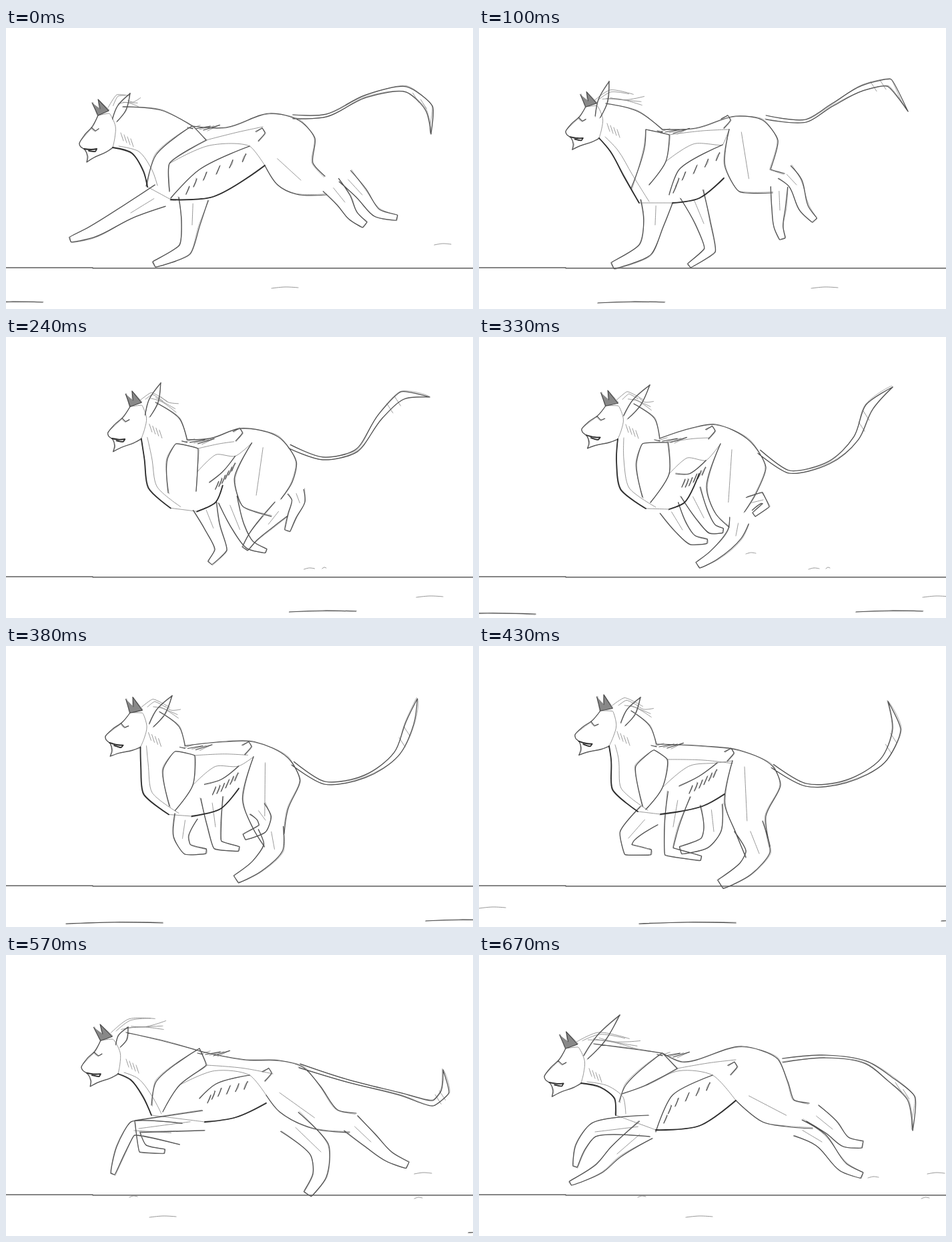
Animation, 700 px wide and 421 px high, one loop 750 ms. Source, as an HTML page:

```html
<!DOCTYPE html>
<html lang="en">
<head>
<meta charset="utf-8">
<title>Run cycle</title>
<style>
html, body { margin: 0; width: 100%; height: 100%; overflow: hidden; background: #fff; }
svg { display: block; width: 100%; height: 100%; }
path { fill: none; stroke-linecap: round; stroke-linejoin: round; }
</style>
</head>
<body>
<svg id="stage" viewBox="0 0 700 421">
  <path d="M0 359.2H130M130 359.8H700" stroke="#3c3c3c" stroke-width="1.2"/>
</svg>
<script>
// Joints of the skeleton in each key pose; outlines and details are built from them.
// head: nose, brow, jaw, ear tip, mane tip, crown, neck. size: thickness of the four legs.
const poses = [
  { head: '110,173 138,131 160,179 186,98 220,106 175,118 232,123',
    spine: '280,147 330,149 395,128 440,139 463,165 460,202 478,222',
    chest: '188,187 206,215 212,238', belly: '247,257 310,253 388,206',
    thigh: '388,206 407,235 435,249 480,250', rib: '247,255 290,212 365,177',
    blade: '210,237 225,190 280,147 300,168 245,203 245,245',
    tail: '430,133 480,131 540,102 600,92 634,120 637,159',
    foreL: '231,251 185,274 128,306 96,317', foreR: '281,256 277,292 268,332 222,354',
    hindL: '487,235 506,258 520,281 538,295', hindR: '508,222 532,247 556,277 586,284',
    size: '.9,1.1 1,.8' },
  { head: '130,155 160,118 180,165 195,80 266,104 190,113 238,125',
    spine: '275,152 325,150 385,132 425,138 448,168 437,212 458,218',
    chest: '197,185 217,222 240,262', belly: '290,262 330,255 367,225',
    thigh: '375,152 368,205 390,245 440,247', rib: '285,250 300,212 365,175',
    blade: '228,240 248,180 250,152 285,160 280,200 255,235',
    tail: '430,134 490,139 530,115 575,90 615,82 643,125',
    foreL: '266,260 262,292 249,332 200,356', foreR: '319,249 335,290 346,333 315,356',
    hindL: '450,238 449,270 449,298 455,316', hindR: '458,216 474,232 487,270 503,288',
    size: '1.2,.9 .85,.9' },
  { head: '152,147 184,105 200,152 219,67 275,103 220,97 258,122',
    spine: '272,155 300,160 350,140 410,147 438,182 437,207 420,232',
    chest: '208,180 214,225 245,256', belly: '287,263 318,247 322,232',
    thigh: '372,158 343,205 355,248 410,260', rib: '310,225 330,200 345,175',
    blade: '242,230 245,180 260,160 290,172 288,200 300,222',
    tail: '428,160 480,171 525,161 560,100 600,78 643,98',
    foreL: '305,252 312,282 323,327 286,356', foreR: '341,250 356,295 374,324 403,337',
    hindL: '425,248 396,268 380,285 375,304', hindR: '450,222 446,248 428,277 427,303',
    size: '1,.7 .9,.9' },
  { head: '154,138 190,103 208,153 256,72 280,98 232,100 263,122',
    spine: '271,152 320,136 355,131 405,155 430,195 415,235 398,262',
    chest: '206,185 212,228 250,257', belly: '285,258 308,248 330,205',
    thigh: '362,160 341,225 355,265 375,285', rib: '295,205 315,205 340,185',
    blade: '245,240 236,190 245,160 283,158 285,205 257,248',
    tail: '420,172 465,202 525,188 565,152 585,105 620,75',
    foreL: '285,256 303,286 320,304 342,306', foreR: '317,232 335,268 350,288 366,290',
    hindL: '390,275 383,295 352,327 328,342', hindR: '405,250 424,241 430,252 412,266',
    size: '.8,.8 1,.7' },
  { head: '144,133 182,97 195,150 242,77 280,95 228,97 256,120',
    spine: '266,147 340,150 390,156 440,180 452,208 430,255 436,300',
    chest: '198,170 200,215 238,248', belly: '272,252 335,240 368,222',
    thigh: '380,172 368,235 385,280 400,317', rib: '300,210 330,195 357,175',
    blade: '245,240 235,180 262,156 282,170 275,212 250,245',
    tail: '440,180 490,208 550,203 605,172 626,125 613,83',
    foreL: '255,254 222,285 224,305 258,309', foreR: '300,222 289,268 285,308 333,318',
    hindL: '404,270 418,308 400,333 362,357', hindR: '348,238 350,275 338,295 302,306',
    size: '.95,.85 1.5,1.1' },
  { head: '113,168 142,128 168,178 183,108 258,100 180,116 240,130',
    spine: '295,145 360,157 410,158 445,168 470,195 497,232 525,237',
    chest: '187,187 205,212 218,240', belly: '298,250 345,243 390,222',
    thigh: '390,210 410,235 460,260 515,266', rib: '290,215 315,193 365,180',
    blade: '218,225 225,190 290,140 300,165 260,195 235,235',
    tail: '440,166 510,188 590,208 640,222 658,205 655,172',
    foreL: '262,268 190,260 173,290 160,328', foreR: '296,248 197,257 205,290 238,294',
    hindL: '517,252 545,277 574,302 602,315', hindR: '425,250 470,292 470,330 452,358',
    size: '.8,.75 1,1.3' },
  { head: '98,182 130,140 153,192 211,90 260,130 172,133 240,142',
    spine: '275,147 305,160 395,137 447,155 463,190 472,217 495,222',
    chest: '182,198 203,215 205,240', belly: '265,262 330,256 385,218',
    thigh: '385,218 425,250 460,257 500,260', rib: '265,265 290,210 350,180',
    blade: '210,220 220,195 275,147 297,170 250,195 215,208',
    tail: '455,158 520,152 580,161 615,185 648,215 650,263',
    foreL: '255,256 172,262 152,288 144,317', foreR: '250,262 205,295 180,320 137,342',
    hindL: '500,237 528,258 550,280 575,284', hindR: '478,259 512,277 546,318 574,330',
    size: '.8,.8 1,.9' }
];
const points = text => text.split(' ').map(p => p.split(',').map(Number));
const keys = poses.map(p => Object.fromEntries(Object.entries(p).map(([k, v]) => [k, points(v)])));

// Head drawn from the nose, for a brow at 28,-42 and a jaw at 50,6.
const face = [
  ['b', '28,-42 19,-25 8,-13 0,0 2,5 8,9 12,19 11,28 22,21 40,13 50,6'],
  ['c', '7,8 18,9 26,8 24,12 14,11'],
  ['b', '18,-24 24,-19 29,-22'],
  ['f', '19,-61 28,-42 44,-49 28,-66 31,-52'],
  ['a', '28,-42 45,-45 54,-26 53,-8 50,6']
].map(([w, s]) => [w, points(s)]);

// Marks on the ground: first pose, height, length, left end in each pose from there.
const marks = [
  [0, 411, 100, -45, 178, 349, 565, 693], [0, 389, 40, 398, 498, 588, 665],
  [3, 415, 145, -60, 240, 693], [4, 392, 40, 0, 215, 310],
  [2, 347, 16, 421, 494], [2, 346, 6, 449, 520], [3, 324, 15, 400], [5, 327, 26, 612, 672],
  [6, 333, 16, 583], [0, 324, 25, 642], [5, 362, 12, 185, 238], [5, 364, 12, 612, 663]
];

// [start in ms, place between poses]
const steps = [[0, 0], [50, .5], [100, 1], [190, 2], [240, 2.35], [290, 2.7], [330, 3],
  [380, 3.5], [430, 4], [480, 4.35], [530, 4.7], [570, 5], [620, 5.5], [670, 6]];
const LOOP = 750;

const dist = (p, q) => Math.hypot(q[0] - p[0], q[1] - p[1]);
const mix = (p, q, k) => [p[0] + (q[0] - p[0]) * k, p[1] + (q[1] - p[1]) * k];
const add = (p, x, y) => [p[0] + x, p[1] + y];
const rand = n => { const v = Math.sin(n * 127.1) * 43758.5; return v - Math.floor(v); };

function along(pts, t) {
  const u = t * (pts.length - 1), i = Math.min(pts.length - 2, Math.floor(u));
  return mix(pts[i], pts[i + 1], u - i);
}

// Outline around a chain of joints, open at its start.
function sleeve(chain, widths) {
  const left = [], right = [];
  chain.forEach((p, i) => {
    const a = chain[i - 1] || p, b = chain[i + 1] || p, l = dist(a, b) || 1;
    const x = -(b[1] - a[1]) / l * widths[i], y = (b[0] - a[0]) / l * widths[i];
    left.push(add(p, x, y));
    right.unshift(add(p, -x, -y));
  });
  return [...left, ...right];
}

// Smooth path whose tangents shrink at sharp corners.
function curve(pts) {
  const last = pts.length - 1;
  const tan = pts.map((p, i) => {
    if (!i || i === last) return [0, 0];
    const a = pts[i - 1], b = pts[i + 1], la = dist(a, p) || 1, lb = dist(p, b) || 1;
    const u = [(p[0] - a[0]) / la, (p[1] - a[1]) / la], v = [(b[0] - p[0]) / lb, (b[1] - p[1]) / lb];
    const f = Math.max(0, u[0] * v[0] + u[1] * v[1]) * .18;
    return [(u[0] + v[0]) * f, (u[1] + v[1]) * f];
  });
  const at = (x, y) => x.toFixed(1) + ' ' + y.toFixed(1) + ' ';
  let d = 'M' + at(...pts[0]);
  for (let i = 0; i < last; i++) {
    const p = pts[i], q = pts[i + 1], l = dist(p, q), s = tan[i], t = tan[i + 1];
    d += 'C' + at(p[0] + s[0] * l, p[1] + s[1] * l) + at(q[0] - t[0] * l, q[1] - t[1] * l) + at(...q);
  }
  return d;
}

function poseAt(pos) {
  const i = Math.floor(pos), a = keys[i], b = keys[i + 1] || a;
  return Object.fromEntries(Object.keys(a).map(k => [k, a[k].map((p, j) => mix(p, b[k][j], pos - i))]));
}

const stage = document.getElementById('stage');
function pen(stroke, width, fill) {
  const el = document.createElementNS('http://www.w3.org/2000/svg', 'path');
  el.setAttribute('stroke', stroke);
  el.setAttribute('stroke-width', width);
  if (fill) el.style.fill = fill;
  return stage.appendChild(el);
}
// a light, b medium, c dark, f shaded
const pens = {
  ghost: pen('#999', .8), a: pen('#8c8c8c', .9), f: pen('#444', 1.1, '#888'),
  b: pen('#505050', 1.25), c: pen('#2c2c2c', 1.8)
};
let ink, count;

// One pencil line; the stronger ones get a loose second pass.
function line(w, ...pts) {
  ink[w] += curve(pts);
  count++;
  if (w === 'a' || pts.length < 3) return;
  ink.ghost += curve(pts.map((p, i) =>
    add(p, 3 * rand(count * 9 + i) - 1.5, 3 * rand(count * 5 + i + 50) - 1.5)));
}

function drawHead([nose, brow, jaw, ear, mane, crown]) {
  const j = add(jaw, -nose[0], -nose[1]), b = add(brow, -nose[0], -nose[1]);
  for (const [w, pts] of face) {
    line(w, ...pts.map(([x, y]) => {
      const u = (42 * x + 28 * y) / 2268, v = (6 * x - 50 * y) / 2268;
      return add(nose, u * j[0] + v * b[0], u * j[1] + v * b[1]);
    }));
  }
  const root = add(crown, -12, 20);
  line('b', ...sleeve([root, mix(root, ear, .45), ear], [4, 7, 0]));
  for (let i = 0; i < 5; i++) {
    const from = add(mix(brow, crown, .3 + i * .2), 4, -8);
    const to = add(mane, -45 * rand(i + 3), 22 * rand(i + 8) - 10);
    line('a', from, add(mix(from, to, .4), 0, -12 + 4 * i), to);
  }
  for (let i = 0; i < 4; i++) {
    const p = add(jaw, 12 + 5 * i, -22 + 3 * i);
    line('a', p, add(p, 4, 12));
  }
}

function drawBody({ head, spine, chest, belly, thigh, rib, blade }) {
  const jaw = head[2], crown = head[5], neck = head[6], withers = spine[0];
  line('b', crown, neck, withers);
  line('b', ...spine);
  line('c', jaw, ...chest);
  line('a', ...[jaw, ...chest].map((p, i) => add(p, 9 + 2 * i, -2)));
  line('c', ...belly);
  line('b', ...thigh);
  line('b', ...blade);
  line('b', ...rib);
  line('a', chest[2], mix(chest[2], belly[0], .4), belly[0]);
  line('a', blade[3], add(mix(blade[3], spine[2], .5), 0, 8), add(spine[2], -10, 20));
  line('a', blade[4], add(mix(blade[4], rib[2], .5), 0, -14), rib[2], thigh[0]);
  line('a', mix(thigh[0], spine[4], .25), mix(thigh[2], spine[4], .25));

  const hip = mix(spine[2], thigh[0], .4);
  line('b', add(hip, -18, -4), add(hip, -8, -9), add(hip, -4, -2), add(hip, -14, 10));
  for (let i = 0; i < 6; i++) {
    const p = along(rib, .3 + i * .13), q = add(withers, -8 + 6 * i, 2 + i);
    line('b', add(p, 2, 8), add(p, 0, 13), add(p, -3, 20));
    line(i % 2 ? 'a' : 'b', q, add(q, 8 + 18 * rand(i), 14 * rand(i + 4) - 11));
  }
}

const FORE = [20, 13, 9.5, 4], HIND = [15, 12, 8, 5], TAIL = [3, 2, 2, 4, 6, 0];

function drawLimbs({ foreL, foreR, hindL, hindR, size, tail }) {
  const sizes = size.flat();
  [foreL, foreR, hindL, hindR].forEach((leg, i) => {
    const widths = (i < 2 ? FORE : HIND).map(w => w * sizes[i]);
    line('b', ...sleeve(leg, widths));
    line('a', mix(leg[0], leg[1], .2), add(leg[1], 2, 3));
  });
  line('b', ...sleeve(tail, TAIL));
  for (const t of [.68, .75]) {
    const p = along(tail, t);
    line('a', add(p, -4, -6), add(p, 5, 8));
  }
}

function drawMarks(pos) {
  for (const [first, y, len, ...xs] of marks) {
    const u = pos - first;
    if (u < 0 || u > xs.length - 1) continue;
    const i = Math.floor(u), x = xs[i] + ((xs[i + 1] ?? xs[i]) - xs[i]) * (u - i);
    line(len > 50 ? 'b' : 'a', [x, y + 1], [x + len / 2, y - 1], [x + len, y]);
  }
}

function draw(pos) {
  ink = { ghost: '', a: '', f: '', b: '', c: '' };
  count = 0;
  const pose = poseAt(pos);
  drawHead(pose.head);
  drawBody(pose);
  drawLimbs(pose);
  drawMarks(pos);
  for (const k in pens) pens[k].setAttribute('d', ink[k]);
}

let start, shown;
function tick(now) {
  start ??= now;
  const t = (now - start) % LOOP;
  const pos = steps.filter(s => s[0] <= t + .01).pop()[1];
  if (pos !== shown) draw(shown = pos);
  requestAnimationFrame(tick);
}
draw(0);
requestAnimationFrame(tick);
</script>
</body>
</html>
```
